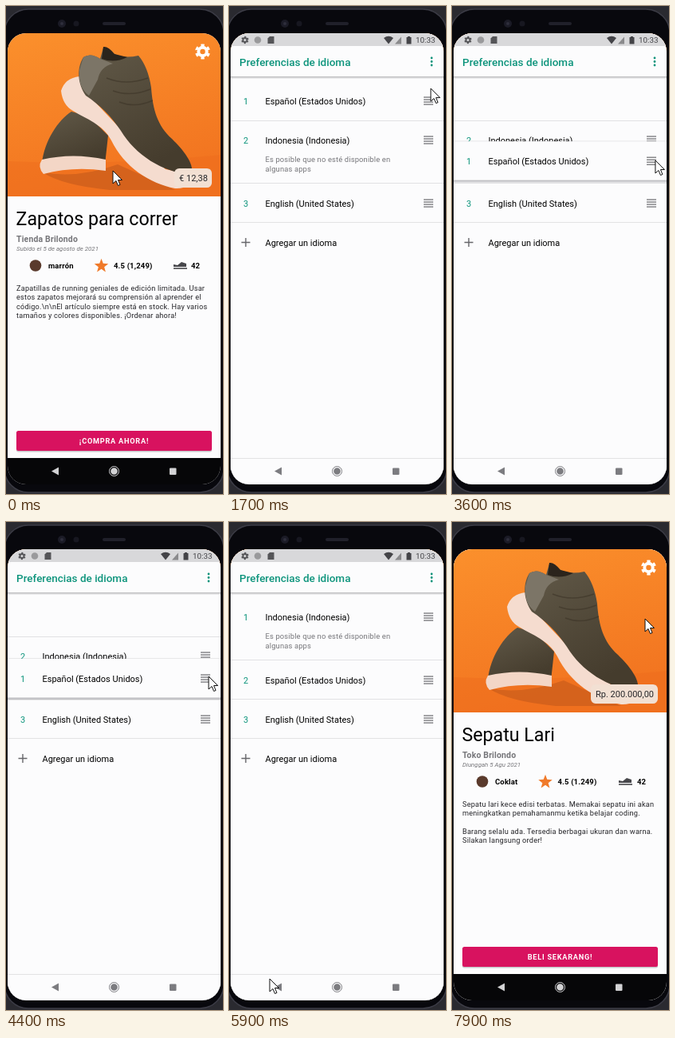
These frames come from a looping animation (272x610 px, 8000 ms). An HTML page:

```html
<!DOCTYPE html>
<html lang="es">
<head>
<meta charset="utf-8">
<style>
html, body { margin: 0; height: 100%; overflow: hidden; background: #0b0b10 }
svg { display: block; width: 100vw; height: 100vh }
text { font-family: Roboto, Arial, sans-serif; white-space: pre }
</style>
</head>
<body>
<svg id="stage" viewBox="0 0 272 610"></svg>
<script>
const LOOP = 8000, PAPER = '#fcfcfd', GREEN = '#0d947c', GREY = '#76767a', INK = '#26262a';

const text = (x, y, size, str, attrs = '') =>
  `<text x="${x}" y="${y}" font-size="${size}" ${attrs}>${str}</text>`;
const rect = (x, y, w, h, fill, attrs = '') =>
  `<rect x="${x}" y="${y}" width="${w}" height="${h}" fill="${fill}" ${attrs}/>`;
const path = (d, fill, attrs = '') => `<path d="${d}" fill="${fill}" ${attrs}/>`;
const circle = (x, y, r, fill, attrs = '') =>
  `<circle cx="${x}" cy="${y}" r="${r}" fill="${fill}" ${attrs}/>`;

const gear = (x, y, s, color) => `<g transform="translate(${x} ${y}) scale(${s})" stroke="${color}">
  ${circle(0, 0, 5.3, 'none', 'stroke-width="4"')}
  ${circle(0, 0, 8, 'none', 'stroke-width="3.4" pathLength="12" stroke-dasharray="1" transform="rotate(15)"')}</g>`;

const star = (cx, cy, r) => path('M' + Array.from({ length: 10 }, (_, i) => {
  const a = i * Math.PI / 5, k = i % 2 ? r * .42 : r;
  return (cx + k * Math.sin(a)).toFixed(2) + ' ' + (cy - k * Math.cos(a)).toFixed(2);
}).join('L') + 'Z', '#f07a2a');

const photo = rect(2, 34, 267, 204, 'url(#wall)') +
  path('M2 194Q130 200 269 186V238H2Z', '#ea6a1c', 'opacity=".4"') +
  path('M46 208Q90 216 140 198L212 230H130Q70 224 46 208Z', '#b4501a', 'opacity=".45"') +
  // rear shoe
  path('M82 132C66 142 48 168 45 197Q84 186 124 198L128 162L104 138Z', 'url(#knit)') +
  path('M45 192Q84 183 125 192V206Q84 200 47 210Q39 201 45 192Z', '#f3d6c6') +
  // front shoe
  path('M92 88Q74 90 69 106Q71 124 84 131C100 141 122 148 132 168C148 201 180 222 212 228Q232 229 235 211L200 204L140 150L104 112Z', '#f5dccf') +
  path('M97 64C88 78 90 98 100 112C118 124 132 138 144 156C162 186 196 208 233 211C236 196 222 180 208 166C190 150 184 130 182 102Q178 76 166 62Q148 66 136 60L122 52L118 66Q106 58 97 64Z', 'url(#knit)') +
  path('M97 64Q106 58 118 66L134 72Q118 76 115 92L104 112Q90 102 92 80Z', '#7c7567') +
  path('M122 51Q128 50 136 60L152 64Q136 72 120 66Z', '#2b241c') +
  path('M126 90Q150 100 178 90M134 106Q156 114 181 104M142 120Q162 128 184 118', 'none', 'stroke="#3d3427" stroke-width="1.500" opacity=".6"') +
  gear(246.5, 57, .98, '#fff');

const nav = (bar, icon) => rect(2, 565, 267, 34, bar) + `<g fill="${icon}">
  <path d="M57 581.5L66 576.5V586.5Z"/><circle cx="135.500" cy="581.500" r="4.300"/>
  <rect x="205" y="577.500" width="8.500" height="8.500" rx="1"/></g>` +
  circle(135.5, 581.5, 6, 'none', `stroke="${icon}"`);

const es = {
  title: 'Zapatos para correr', shop: 'Tienda Brilondo', date: 'Subido el 5 de agosto de 2021',
  price: '€ 12,38', pill: 211, dot: 37, color: 'marrón', star: 119.5, rating: '4.5 (1,249)', shoe: 210,
  body: ['Zapatillas de running geniales de edición limitada. Usar',
    'estos zapatos mejorará su comprensión al aprender el',
    'código.\\n\\nEl artículo siempre está en stock. Hay varios',
    'tamaños y colores disponibles. ¡Ordenar ahora!'],
  buy: '¡COMPRA AHORA!'
};
const id = {
  title: 'Sepatu Lari', shop: 'Toko Brilondo', date: 'Diunggah 5 Agu 2021',
  price: 'Rp. 200.000,00', pill: 174, dot: 38, color: 'Coklat', star: 117, rating: '4.5 (1.249)', shoe: 209,
  body: ['Sepatu lari kece edisi terbatas. Memakai sepatu ini akan',
    'meningkatkan pemahamanmu ketika belajar coding.', '',
    'Barang selalu ada. Tersedia berbagai ukuran dan warna.',
    'Silakan langsung order!'],
  buy: 'BELI SEKARANG!'
};

function product(p) {
  const bold = 'font-weight="700" letter-spacing=".15"';
  return rect(2, 34, 267, 564, PAPER) + photo +
    rect(p.pill, 203, 258 - p.pill, 24, '#f2e0d3', 'rx="6"') +
    text((p.pill + 258) / 2 + .5, 219, 11, p.price, `text-anchor="middle" fill="${INK}"`) +
    text(12.5, 274, 23.2, p.title) +
    text(13, 295, 10.5, p.shop, `${bold} fill="${GREY}"`) +
    text(13, 306, 7.9, p.date, `font-style="italic" fill="${GREY}"`) +
    circle(p.dot, 324.5, 7.3, '#5a3a2c') + text(p.dot + 16, 328, 9.5, p.color, bold) +
    star(p.star, 325, 9.2) + text(p.star + 15.5, 328, 9.5, p.rating, bold) +
    `<g transform="translate(${p.shoe} 320)">` +
    path('M0 3L5 4L10 0L16 2V6H0Z', '#48484c') + path('M0 8H17', 'none', 'stroke="#48484c" stroke-width="1.600"') +
    '</g>' + text(232, 328, 9.5, 42, bold) +
    p.body.map((s, i) => text(13, 355.7 + 11.4 * i, 9.2, s, `letter-spacing=".2" fill="${INK}"`)).join('') +
    rect(13, 532, 245, 25.5, '#88888c', 'rx="2.500" opacity=".45"') +
    rect(13, 531, 245, 25, '#d8125f', 'rx="2.500"') +
    text(135.5, 547.3, 9.2, p.buy, 'text-anchor="middle" font-weight="700" letter-spacing=".75" fill="#fff"') +
    nav('#060608', '#d2d2d4');
}

const lines = (x, y) => [-4.5, -1.5, 1.5, 4.5].map(d => rect(x, y + d - .6, 12, 1.3, GREY)).join('');
// Row contents are centred on y = 0.
const row = (key, label, note = '') => `<g id="${key}">` +
  (key === 'spanish' ? `<g id="card">${rect(2, -23, 267, 50, GREY, 'opacity=".3"')}
    ${rect(2, -25, 267, 50, GREY, 'opacity=".3"')}${rect(2, -24.5, 267, 48.5, PAPER)}</g>` : '') +
  text(21, 4, 11, '', `id="${key}No" text-anchor="middle" fill="${GREEN}"`) +
  text(45.5, 4, 11, label) + lines(244, 0) + note + '</g>';
const note = (y, s) => text(45.5, y, 9.4, s, `letter-spacing=".15" fill="${GREY}"`);
const rule = (y, key = '') => rect(2, y, 267, 1, '#e2e2e4', key);

const settings = rect(2, 50, 267, 548, PAPER, 'id="sheet"') +
  rule(172, 'id="rule"') + rule(221) + rule(270) +
  row('indonesian', 'Indonesia (Indonesia)',
    note(27.5, 'Es posible que no esté disponible en') + note(39, 'algunas apps')) +
  row('english', 'English (United States)') + row('spanish', 'Español (Estados Unidos)') +
  path('M15.500 295.500H26.500M21 290V301', 'none', 'stroke="#66666a" stroke-width="1.400"') +
  text(45.5, 299.5, 11, 'Agregar un idioma') +
  rect(2, 88, 267, 3, 'url(#shade)') +
  text(13, 75, 13.5, 'Preferencias de idioma', `font-weight="500" fill="${GREEN}"`) +
  [65, 69.5, 74].map(y => circle(254, y, 1.4, GREEN)).join('');

const status = rect(2, 34, 267, 16, '#d8d8da') + gear(20, 42.5, .48, '#555558') +
  circle(36, 42.5, 4.3, '#9a9a9c') +
  path('M51 38H56.500V47H48.500V40.500Z', '#555558') +
  path('M194 40Q200 35.500 206 40L200 47.500Z', '#444448') +
  path('M208 47.500L216 38.500V47.500Z', '#8a8a8c') +
  path('M224 38H227V39H228.500V47.500H222.500V39H224Z', '#444448') +
  text(234, 46.3, 9.8, '10:33', 'fill="#444448"');

const gradient = (key, x, y, from, to) => `<linearGradient id="${key}" x2="${x}" y2="${y}">
  <stop stop-color="${from}"/><stop offset="1" stop-color="${to}"/></linearGradient>`;

stage.innerHTML = '<defs>' + gradient('wall', .3, 1, '#fb902c', '#f27420') +
  gradient('knit', .5, 1, '#625a49', '#453c2d') + gradient('shade', 0, 1, '#b8b8ba', '#f4f4f5') +
  '<clipPath id="screen"><rect x="2" y="34" width="267" height="564" rx="23"/></clipPath></defs>' +
  rect(0, 0, 272, 610, '#2a2a30') +
  rect(-2, 4, 275, 604, '#08080d', 'rx="30" stroke="#3c3c46" stroke-width="1.500"') +
  circle(70, 22, 5, '#1b1b26') + circle(70, 22, 2, '#2e2e3c') + circle(88, 22, 3.5, '#171720') +
  rect(121, 20, 29, 4, '#20202a', 'rx="2"') +
  `<g clip-path="url(#screen)"><g id="spanishShop">${product(es)}</g><g id="indoShop">${product(id)}</g>
  <g id="window">${settings}</g><g id="status">${status}</g>
  <g id="nav">${rect(2, 565, 267, 33, PAPER)}${rule(565)}
  ${rect(25, 566, 73, 32, '#eeeef0', 'rx="16" id="ripple"')}
  <g id="navIcons">${nav('none', '#7c7c80')}</g></g></g>` +
  path('M0 0V16L4 12.500L6.500 18.500L9 17.500L6.500 11.500H11.500Z', '#fff', 'id="cursor" stroke="#111"');

const $ = key => document.getElementById(key);
const set = (key, attr, value) => $(key).setAttribute(attr, value);
const move = (key, x, y) => set(key, 'transform', `translate(${x} ${y})`);
const ramp = (t, a, b) => Math.min(1, Math.max(0, (t - a) / (b - a)));
const smooth = p => p * p * (3 - 2 * p);

// Eased interpolation through [time, ...values] stops.
function track(t, stops) {
  const i = Math.max(1, stops.findIndex(s => s[0] > t));
  const a = stops[i - 1], b = stops[i];
  const p = smooth(ramp(t, a[0], b[0]));
  return a.slice(1).map((v, k) => v + (b[k + 1] - v) * p);
}

const pointer = [[0, 134, 206], [900, 247, 60], [1300, 247, 60], [1900, 255, 118], [2050, 255, 118],
  [2700, 256, 193], [4400, 254, 193], [4800, 254, 194], [5800, 51, 571], [6300, 51, 571],
  [6800, 58, 580], [7300, 58, 580], [7900, 242, 121], [LOOP, 242, 121]];
const drag = [[0, 118.5], [2050, 118.5], [2700, 191.5], [4400, 195.5], [4700, 197.5], [LOOP, 197.5]];

function draw(t) {
  const enter = ramp(t, 1000, 1360), bars = ramp(t, 1150, 1360), leave = ramp(t, 7090, 7300);
  const dropped = t >= 4600, held = t > 2000 && !dropped;

  set('indoShop', 'visibility', t > 4700 ? 'visible' : 'hidden');
  set('window', 'opacity', enter * (1 - leave));
  move('window', 0, 38 * (1 - enter) ** 2 + 30 * leave ** 1.2);
  set('sheet', 'y', enter < 1 ? 50 : 34);
  set('status', 'opacity', bars * (1 - .9 * ramp(t, 7000, 7100)) * (1 - leave));
  set('nav', 'opacity', bars * (1 - leave));
  set('navIcons', 'opacity', 1 - .6 * ramp(t, 7000, 7100));
  set('ripple', 'opacity', ramp(t, 6950, 7080));

  const lift = smooth(ramp(t, 4600, 4780));
  move('spanish', 0, track(t, drag)[0]);
  move('indonesian', 0, 167.5 - 49 * lift);
  move('english', 0, 246.5);
  set('rule', 'y', dropped ? 172 : 143);
  set('card', 'visibility', held ? 'visible' : 'hidden');
  $('spanishNo').textContent = dropped ? 2 : 1;
  $('indonesianNo').textContent = dropped ? 1 : 2;
  $('englishNo').textContent = 3;
  move('cursor', ...track(t, pointer));
}

const start = performance.now();
(function tick() {
  draw((performance.now() - start) % LOOP);
  requestAnimationFrame(tick);
})();
</script>
</body>
</html>
```
